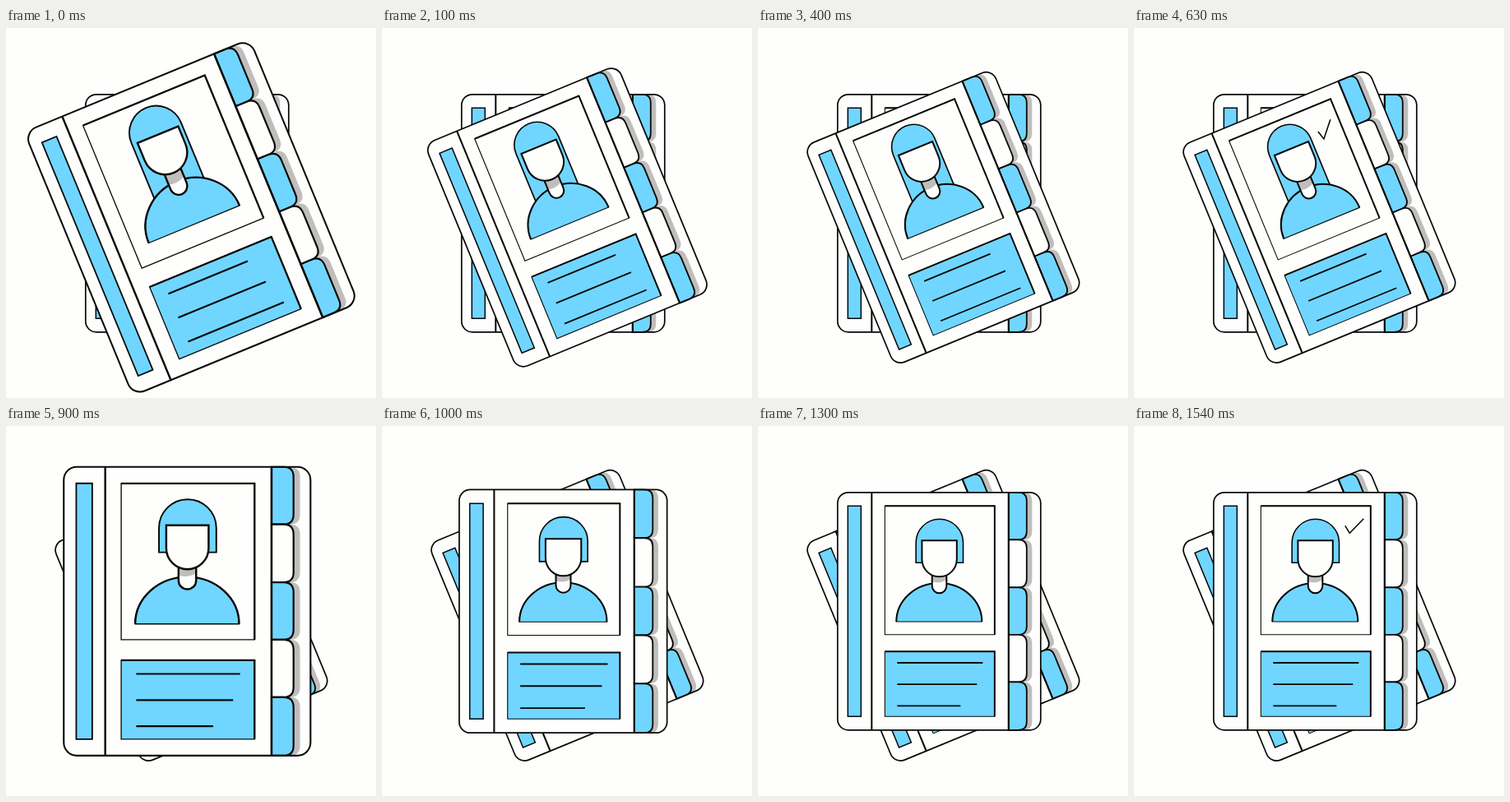
An HTML page for the animation above (1.84 s loop, 450x450 px).

```html
<!DOCTYPE html>
<html lang="en">
<head>
<meta charset="utf-8">
<title>Profile folders</title>
<style>
  html, body { margin: 0; width: 100%; height: 100%; overflow: hidden; background: #fefefd; }
  svg { display: block; width: 100vw; height: 100vh; }
</style>
</head>
<body>
<svg id="stage" viewBox="0 0 450 450"></svg>
<script>
const BLUE = '#70d6ff', PAPER = '#fefefd', INK = '#080806', GREY = '#c0bebd';
const LOOP = 1840, STEPS = 55, SWAP = 27;
const stage = document.getElementById('stage');

function add(parent, tag, attrs) {
  const node = document.createElementNS('http://www.w3.org/2000/svg', tag);
  for (const key in attrs) node.setAttribute(key, attrs[key]);
  parent.appendChild(node);
  return node;
}

function path(parent, d, fill = 'none', width = 1.7) {
  const attrs = { d, fill };
  if (width) Object.assign(attrs, { stroke: INK, 'stroke-width': width });
  return add(parent, 'path', attrs);
}

const cover = (parent, attrs) =>
  add(parent, 'rect', { x: -123.5, y: -144.5, width: 247, height: 289, rx: 13, ...attrs });

const box = (l, t, r, b) => `M${l} ${t}H${r}V${b}H${l}Z`;

// Thin frame with a heavier top and right edge
function frame(parent, l, t, r, b, fill) {
  path(parent, box(l, t, r, b), fill, 1.1);
  path(parent, `M${l} ${t}H${r}V${b}`, 'none', 1.9);
}

// Index tab with rounded right corners
const tab = (l, t, r, b, c = 10) =>
  `M${l} ${t}H${r - c}Q${r} ${t} ${r} ${t + c}V${b - c}Q${r} ${b} ${r - c} ${b}H${l}Z`;

// Square top, semicircular bottom
const cup = (x, r, top, bottom) =>
  `M${x - r} ${top}H${x + r}V${bottom - r}A${r} ${r} 0 0 1 ${x - r} ${bottom - r}Z`;

// Semicircular top, square bottom
const dome = (x, r, top, bottom) =>
  `M${x - r} ${bottom}V${top + r}A${r} ${r} 0 0 1 ${x + r} ${top + r}V${bottom}Z`;

function drawPortrait(g, { hair, face, body, neck }) {
  path(g, dome(hair.x, hair.r, hair.top, hair.bottom), BLUE, 1.6);
  const arc = `M${-body.half} ${body.base}A${body.half} ${body.rise} 0 0 1 ${body.half} ${body.base}`;
  path(g, arc + 'Z', BLUE, 1.1);
  path(g, arc, 'none', 2);
  const top = neck - 26;
  path(g, cup(.2, 8.8, top, neck), PAPER, 0);
  path(g, `M-8.6 ${top}V${neck - 14}Q0 ${neck - 11} 9 ${neck - 16}V${top}Z`, GREY, 0);
  path(g, cup(.2, 8.8, top, neck), 'none', 2);
  path(g, cup(face.x, face.r, face.top, face.bottom), PAPER, 2);
}

function makeCard(p) {
  const g = add(stage, 'g', {});
  cover(g, { fill: PAPER });

  const edges = [-144.5, -87, -29, 28.5, 86, 144.5];
  const eachTab = draw => edges.slice(0, 5).forEach((y, i) => draw(y, edges[i + 1], i));
  eachTab((t, b) => path(g, tab(84.5, t, 113, b), GREY, 0));
  eachTab((t, b, i) => path(g, tab(84.5, t, 106.5, b), i % 2 ? PAPER : BLUE, 1.8));

  path(g, box(-111, -128, -95, 128), BLUE, 1.5);
  path(g, 'M-82 -144.5V144.5M84.5 -144.5V144.5', 'none', 2);
  frame(g, -66, -128, 67.5, 28.5, PAPER);
  frame(g, -66, 49, 67.5, 128, BLUE);
  p.lines.forEach((x, i) => path(g, `M-51 ${62.7 + i * 26.2}H${x}`, 'none', 1.8));
  drawPortrait(g, p);
  cover(g, { fill: 'none', stroke: INK, 'stroke-width': 1.7 });

  const check = path(g, p.check, 'none', 1.6);
  check.setAttribute('pathLength', 1);
  return { ...p, g, check };
}

const man = makeCard({
  x: 220.3, y: 225.3, angle: 0, start: SWAP, pop: .215, decay: .74,
  checkAt: 42, checkSteps: 4, check: 'M36.5 -104L42 -95L59 -112.5',
  lines: [53, 46, 26],
  body: { half: 52, base: 12.7, rise: 47 }, neck: -22,
  hair: { x: .5, r: 28.7, top: -112, bottom: -59 },
  face: { x: .3, r: 21.2, top: -86, bottom: -42 }
});

const woman = makeCard({
  x: 225.4, y: 230.4, angle: -22.4, start: 0, pop: .2, decay: .675,
  checkAt: 16, checkSteps: 3, check: 'M38.4 -97.2L41.5 -86.2L57.8 -105',
  lines: [36, 45, 54],
  body: { half: 49.8, base: 7.5, rise: 47 }, neck: -25.5,
  hair: { x: -.2, r: 27.2, top: -120.2, bottom: -20 },
  face: { x: .6, r: 22.3, top: -90.5, bottom: -48.7 }
});

function pose(card, step) {
  const age = step - card.start;
  const extra = age >= 0 && age < 17 ? card.pop * Math.exp(-card.decay * age) : 0;
  card.g.setAttribute('transform',
    `translate(${card.x} ${card.y}) rotate(${card.angle}) scale(${1 + extra})`);
  const done = Math.max(0, Math.min(1, (step - card.checkAt) / card.checkSteps));
  card.check.setAttribute('visibility', done ? 'visible' : 'hidden');
  card.check.setAttribute('stroke-dasharray', done < 1 ? `${done} 2` : 'none');
}

function render(ms) {
  // The motion runs in 55 even steps per loop
  const step = Math.floor((ms % LOOP + 8) * STEPS / LOOP) % STEPS;
  pose(man, step);
  pose(woman, step);
  const top = step < SWAP ? woman : man;
  if (stage.lastChild !== top.g) stage.appendChild(top.g);
}

const begin = performance.now();
function tick() {
  render(performance.now() - begin);
  requestAnimationFrame(tick);
}
tick();
</script>
</body>
</html>
```
